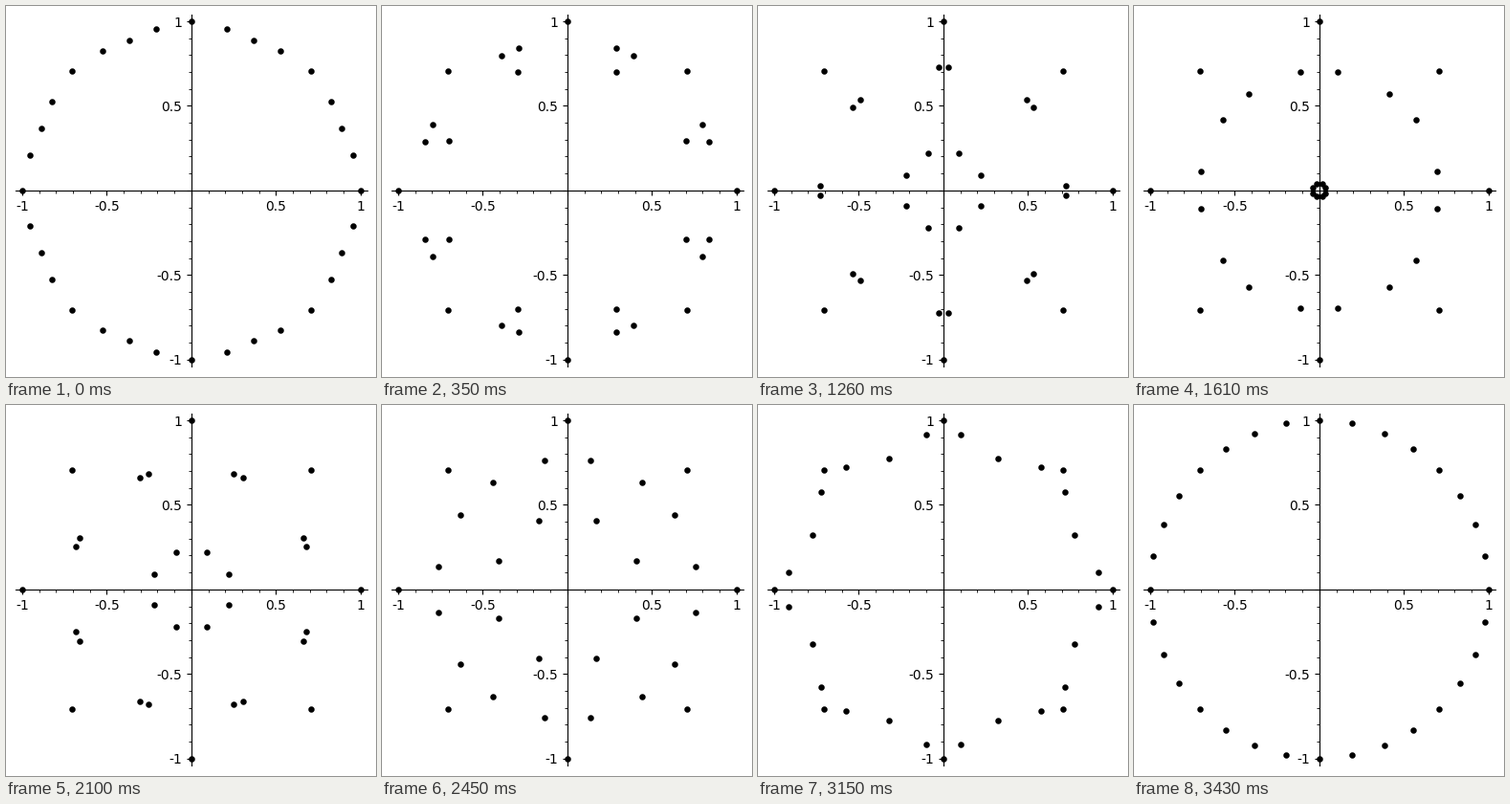
Write a matplotlib script that moves like this. It is 387 px wide and 388 px high and loops after 3500 ms.

```python
import numpy as np
import matplotlib.pyplot as plt
from matplotlib.animation import FuncAnimation
from matplotlib.ticker import FuncFormatter, MultipleLocator

WIDTH, HEIGHT, DPI = 387, 388, 100
FRAMES, INTERVAL = 50, 70
POINTS = 32
LIMIT = 1.04
LEFT, BOTTOM, SIDE = 9.98, 11.28, 367.74

plt.rcParams["font.family"] = "DejaVu Sans"

fig = plt.figure(figsize=(WIDTH / DPI, HEIGHT / DPI), dpi=DPI, facecolor="white")
ax = fig.add_axes([LEFT / WIDTH, BOTTOM / HEIGHT, SIDE / WIDTH, SIDE / HEIGHT])
ax.set(xlim=(-LIMIT, LIMIT), ylim=(-LIMIT, LIMIT))
ax.patch.set_visible(False)

for side in ("left", "bottom"):
    ax.spines[side].set_position(("data", 0))
for side in ("right", "top"):
    ax.spines[side].set_visible(False)


def tick_label(value, _):
    return "" if abs(value) < 1e-9 else f"{value:g}"


for axis in (ax.xaxis, ax.yaxis):
    axis.set_major_locator(MultipleLocator(0.5))
    axis.set_minor_locator(MultipleLocator(0.1))
    axis.set_major_formatter(FuncFormatter(tick_label))
ax.tick_params(labelsize=10)

# Each root of unity w travels in a straight line to w**9.
start = np.exp(2j * np.pi * np.arange(POINTS) / POINTS)
end = start ** 9


def positions(frame):
    t = (frame + 1) / FRAMES
    z = (1 - t) * start + t * end
    return np.column_stack([z.real, z.imag])


dots = ax.scatter(*positions(0).T, s=10, c="black", linewidths=1.5,
                  zorder=5, clip_on=False)


def update(frame):
    dots.set_offsets(positions(frame))
    return (dots,)


anim = FuncAnimation(fig, update, frames=FRAMES, interval=INTERVAL,
                     repeat=True, repeat_delay=0)
plt.show()
```
